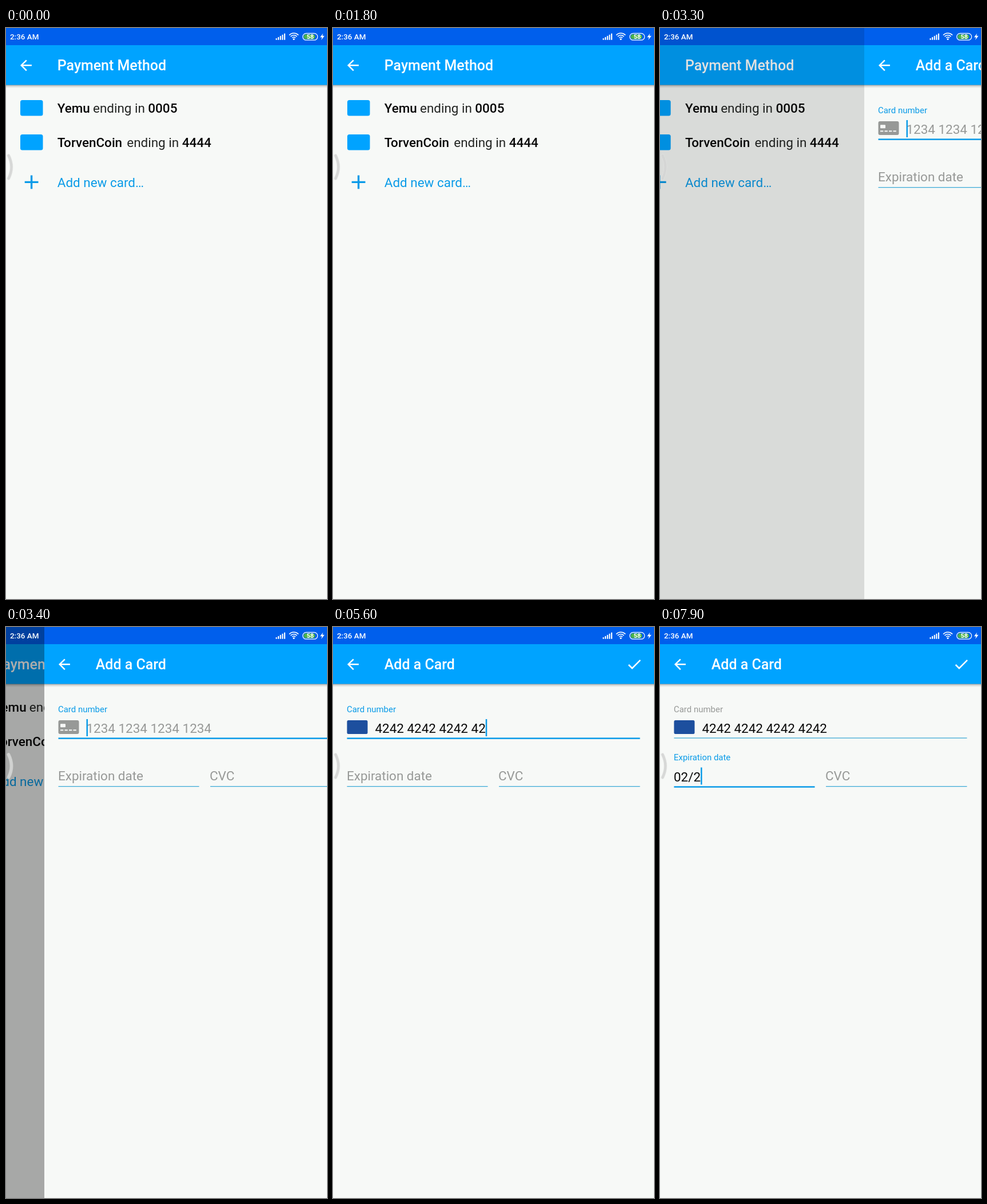
These frames come from a looping animation (561 px wide and 998 px high, 8000 ms). An HTML page with a canvas:

```html
<!DOCTYPE html>
<html lang="en">
<head>
<meta charset="utf-8">
<title>Payment method</title>
<style>
  html, body { margin: 0; width: 100%; height: 100%; overflow: hidden; background: #f7f9f7; }
  canvas { display: block; width: 561px; height: 998px; }
</style>
</head>
<body>
<canvas id="stage"></canvas>
<script>
const W = 561, H = 998, LOOP = 8000, STEP = 100;
const DP = W / 450;
const BODY = 18 * DP, SMALL = 12 * DP, TITLE = 20 * DP;
const LEFT = 72 * DP, EDGE = 24.5;

const BG = '#f7f9f7', BAR = '#00a3ff', STATUS = '#005fec';
const ACCENT = '#0a9be8', THIN = '#3fabd8', HINT = '#979997', INK = '#080808';

const SLIDE_AT = 3203, SLIDE_MS = 325;
const NUMBER = '4242 4242 4242 4242', NUMBER_AT = 4600, DIGIT_MS = 72;
const EXPIRY_AT = 5800, FLOAT_MS = 200;
const EXPIRY_KEYS = [[7000, '0'], [7300, '02/'], [7800, '02/2']];

const ICON = {
  back: new Path2D('M20 11H7.83l5.59-5.59L12 4l-8 8 8 8 1.41-1.41L7.83 13H20z'),
  check: new Path2D('M9 16.17L4.83 12l-1.42 1.41L9 19 21 7l-1.41-1.41z'),
  plus: new Path2D('M19 13h-6v6h-2v-6H5v-2h6V5h2v6h6z')
};

const canvas = document.getElementById('stage');
const c = canvas.getContext('2d');
const ratio = window.devicePixelRatio || 1;
canvas.width = Math.round(W * ratio);
canvas.height = Math.round(H * ratio);

const clamp = v => Math.max(0, Math.min(1, v));
const mix = (a, b, k) => a + (b - a) * k;

// cubic-bezier(.4, 0, .2, 1)
function ease(x) {
  if (x <= 0 || x >= 1) return clamp(x);
  let lo = 0, hi = 1;
  for (let i = 0; i < 24; i++) {
    const s = (lo + hi) / 2, r = 1 - s;
    if (1.2 * s * r * r + 0.6 * s * s * r + s * s * s < x) lo = s; else hi = s;
  }
  return lo * lo * (3 - 2 * lo);
}

function text(str, x, y, size, color, weight = 400) {
  c.font = `${weight} ${size}px Roboto, sans-serif`;
  c.fillStyle = color;
  c.fillText(str, x, y);
  return x + c.measureText(str).width;
}

function rect(x, y, w, h, color) {
  c.fillStyle = color;
  c.fillRect(x, y, w, h);
}

function pill(x, y, w, h, r, color) {
  c.beginPath();
  c.roundRect(x, y, w, h, r);
  c.fillStyle = color;
  c.fill();
}

function icon(path, x, y, scale, color) {
  c.save();
  c.translate(x, y);
  c.scale(scale, scale);
  c.fillStyle = color;
  c.fill(path);
  c.restore();
}

function frame(title) {
  rect(0, 0, W, H, BG);
  const shade = c.createLinearGradient(0, 99, 0, 105);
  shade.addColorStop(0, 'rgba(0,0,0,.42)');
  shade.addColorStop(0.35, 'rgba(0,0,0,.17)');
  shade.addColorStop(1, 'rgba(0,0,0,0)');
  rect(0, 99, W, 6, shade);
  rect(0, 30, W, 69.5, BAR);
  rect(0, 0, W, 30, STATUS);
  icon(ICON.back, 20, 50.4, DP, '#fff');
  text(title, LEFT, 74, TITLE, '#fff', 500);
}

function savedCard(name, restX, digits, y) {
  pill(25, y - 22, 39.5, 27.5, 3.5, BAR);
  text(name, LEFT, y, BODY, INK, 500);
  const x = text('ending in ', restX, y, BODY, '#222422');
  text(digits, x, y, BODY, INK, 500);
}

function listPage() {
  frame('Payment Method');
  savedCard('Yemu', 152, '0005', 148);
  savedCard('TorvenCoin', 211.3, '4444', 208);
  icon(ICON.plus, 24.2, 249, 1.7, ACCENT);
  text('Add new card…', LEFT, 278, BODY, ACCENT);
}

function underline(x, w, y, focused) {
  if (focused) rect(x, y, w, 2.5, ACCENT);
  else rect(x, y, w, 1.3, THIN);
}

function caret(x, y, since) {
  if (since % 1000 < 500) rect(x, y, 2.5, 30, ACCENT);
}

function blankCard() {
  pill(EDGE, 163, 36, 24, 3, '#979997');
  pill(28, 169.3, 9, 6, 1, BG);
  for (let i = 0; i < 4; i++) rect(28 + i * 7.5, 179.3, 5.3, 2, BG);
}

function numberField(t, focused) {
  const typed = t < NUMBER_AT ? 0 : Math.min(16, Math.floor((t - NUMBER_AT) / DIGIT_MS) + 1);
  const shown = NUMBER.slice(0, typed + Math.max(0, Math.floor((typed - 1) / 4)));
  text('Card number', 24, 148.6, SMALL, focused ? ACCENT : HINT);
  let end = 73.5;
  if (typed) {
    pill(EDGE, 163, 36, 24, 2.5, '#1d4f9e');
    end = text(shown, 73.5, 184.5, BODY, INK);
  } else {
    blankCard();
    text(NUMBER.length && '1234 1234 1234 1234', 73.5, 184.5, BODY, HINT);
  }
  underline(EDGE, 512, 193.4, focused);
  if (focused) caret(end, 161, typed ? 0 : t - 3200);
}

function expiryField(t, focused) {
  const k = ease(clamp((t - EXPIRY_AT) / FLOAT_MS));
  text('Expiration date', 24, mix(268.2, 233.4, k), mix(BODY, SMALL, k), focused ? ACCENT : HINT);
  underline(EDGE, 246, focused ? 278.2 : 278, focused);
  if (!focused) return;

  let shown = '', since = EXPIRY_AT;
  for (const [at, value] of EXPIRY_KEYS) if (t >= at) { shown = value; since = at; }
  let end = 24;
  if (shown) {
    end = text(shown, 24, 269.5, BODY, INK);
  } else {
    c.globalAlpha = clamp((t - EXPIRY_AT - 100) / FLOAT_MS);
    text('MM/YY', 24, 269.5, BODY, HINT);
    c.globalAlpha = 1;
  }
  caret(end, 245.5, t - since);
}

function formPage(t) {
  const onExpiry = t >= EXPIRY_AT;
  frame('Add a Card');
  icon(ICON.check, 511.5, 50, 1.26, '#fff');
  numberField(t, !onExpiry);
  expiryField(t, onExpiry);
  text('CVC', 289, 268.2, BODY, HINT);
  underline(290, 246.5, 278, false);
}

function statusIcons() {
  text('2:36 AM', 7, 20.3, 13.4, '#fff', 500);
  for (let i = 0; i < 5; i++) rect(471.5 + i * 3.6, 18 - i * 2.1, 2.1, 2.8 + i * 2.1, '#fff');

  c.strokeStyle = '#fff';
  c.lineWidth = 1.7;
  for (const r of [4, 7.5, 11]) {
    c.beginPath();
    c.arc(503, 20, r, -Math.PI * 0.76, -Math.PI * 0.24);
    c.stroke();
  }
  c.beginPath();
  c.arc(503, 19.5, 1.6, 0, 7);
  c.fillStyle = '#fff';
  c.fill();

  pill(520.3, 11, 20, 8.6, 4.3, '#4cb34a');
  c.beginPath();
  c.roundRect(518.6, 9.4, 26, 11.8, 5.9);
  c.lineWidth = 1.2;
  c.stroke();
  text('58', 525.5, 19.2, 10.8, '#fff', 700);

  c.beginPath();
  c.moveTo(554, 9.5);
  c.lineTo(549, 16.2);
  c.lineTo(552.4, 16.2);
  c.lineTo(551, 21);
  c.lineTo(556.5, 13.8);
  c.lineTo(553, 13.8);
  c.fill();
}

function edgeHandle() {
  c.lineCap = 'round';
  c.beginPath();
  c.moveTo(4.5, 223);
  c.quadraticCurveTo(14.5, 243, 4.5, 263);
  c.lineWidth = 6;
  c.strokeStyle = 'rgba(230,232,230,.55)';
  c.stroke();
  c.lineWidth = 4.4;
  c.strokeStyle = 'rgba(210,212,210,.85)';
  c.stroke();
  c.lineCap = 'butt';
}

function shifted(x, draw) {
  c.save();
  c.translate(x, 0);
  draw();
  c.restore();
}

function draw(t) {
  c.setTransform(ratio, 0, 0, ratio, 0, 0);
  const p = ease((t - SLIDE_AT) / SLIDE_MS);
  if (p < 1) {
    rect(0, 0, W, H, BG);
    shifted(-p * W * 0.225, listPage);
    rect(0, 0, W, H, `rgba(0,0,0,${0.375 * Math.pow(p, 1.11)})`);
  }
  if (p > 0) shifted(Math.round((1 - p) * W), () => formPage(t));
  statusIcons();
  edgeHandle();
}

function tick(now) {
  draw(Math.floor((now % LOOP) / STEP) * STEP);
  requestAnimationFrame(tick);
}

draw(0);
requestAnimationFrame(tick);
</script>
</body>
</html>
```
